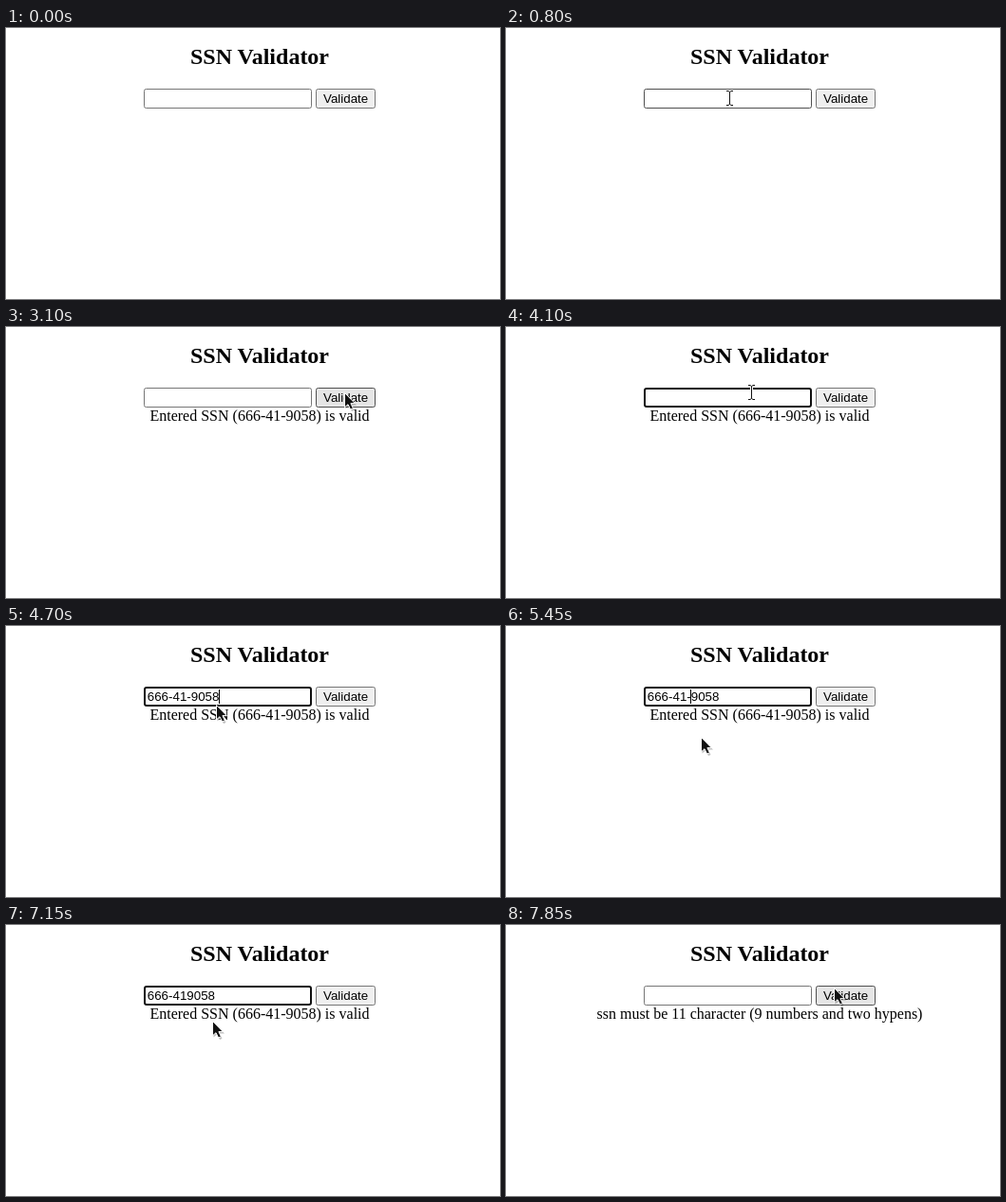
Recreate the animation shown at these times as an HTML page. Size 520 by 286 pixels, loop 8 s.

```html
<!DOCTYPE html>
<html lang="en">
<head>
<meta charset="utf-8">
<title>SSN Validator</title>
<style>
  html, body { margin: 0; width: 520px; height: 286px; overflow: hidden; background: #fff; }
  body { position: relative; color: #000; }
  body > * { position: absolute; box-sizing: border-box; margin: 0; white-space: pre; }
  h2, #message { left: 0; width: 534px; text-align: center; font-family: "Liberation Serif", serif; }
  h2 { top: 17px; font-size: 24px; line-height: 27px; }
  #message { top: 85px; font-size: 16px; line-height: 18px; }
  #field, #button { top: 64px; height: 21px; border: 1px solid #767676; border-radius: 2.5px; }
  #field { left: 145px; width: 177px; }
  #button { left: 326px; width: 63px; background: #efefef; }
  #field.hover, #button.hover { border-color: #4f4f4f; }
  #field.focus { border: 2px solid #101010; border-radius: 3px; }
  #button.hover { background: #e5e5e5; }
  #button.active { background: #f5f5f5; border-color: #8d8d8d; }
  #value, #label { top: 67px; font: 13.3333px/15px "Liberation Sans", sans-serif; }
  #value { left: 148.8px; height: 15px; }
  #label { left: 334px; }
  #caret { position: absolute; top: 0; margin-left: -.28px; width: 1px; height: 15px; background: #000; }
  svg { left: 0; top: 0; overflow: visible; }
</style>
</head>
<body>
<h2>SSN Validator</h2>
<div id="field"></div>
<div id="value"><span id="before"></span><i id="caret"></i><span id="after"></span></div>
<div id="button"></div>
<div id="label">Validate</div>
<div id="message"></div>
<svg width="520" height="286">
  <defs><path id="stem" d="M-3 -7.5H-1L.5 -6.5L2 -7.5H4M.5 -6.5V6.5M-3 7.5H-1L.5 6.5L2 7.5H4" fill="none"/></defs>
  <g id="arrow">
    <path d="M.5 2V17.5L4 14.5L7 20L9.5 19L7 13.5H12Z" opacity=".25"/>
    <path d="M-.5 .5V15.8L3 12.7L5.6 18L8.4 16.8L5.9 11.6H10.3Z" fill="#111" stroke="#fff"/>
  </g>
  <g id="beam">
    <use href="#stem" stroke="#fff" stroke-width="3"/>
    <use href="#stem" stroke="#111"/>
  </g>
</svg>
<script>
const LOOP = 8000, STEP = 50, BLINK = 565;
const SSN = "666-41-9058";

// Pointer sweeps: each eases along a curve from the previous resting point
const home = [1, 78];
const sweeps = [
  { start: 300, end: 800, bend: [118, 44], to: [235, 74] },
  { start: 1650, end: 2350, bend: [347, 105], to: [357, 69] },
  { start: 3100, end: 3550, bend: [307, 72], to: [258, 69] },
  { start: 4050, end: 5050, bend: [248, 95], to: [196, 76] },
  { start: 5200, end: 5450, bend: [263, 84], to: [206, 117] },
  { start: 6900, end: 7700, bend: [219, 80], to: [346, 66] }
];

// What the user does; each event changes part of the form
const events = [
  { at: 0, value: "", caret: 0, message: "", focused: false, pressed: false, blinkFrom: 0 },
  { at: 1050, focused: true, blinkFrom: 1050 },
  { at: 1750, value: SSN, caret: 11, blinkFrom: 1750 },
  { at: 2500, focused: false, pressed: true },
  { at: 2600, value: "", caret: 0, pressed: false, message: `Entered SSN (${SSN}) is valid` },
  { at: 3520, focused: true, blinkFrom: 3520 },
  { at: 4300, value: SSN, caret: 11, blinkFrom: 4300 },
  { at: 5220, caret: 7, blinkFrom: 5220 },
  { at: 6150, value: SSN.slice(0, 6) + SSN.slice(7), caret: 6 },
  { at: 7700, focused: false, pressed: true },
  { at: 7800, value: "", pressed: false, message: "ssn must be 11 character (9 numbers and two hypens)" }
];

const el = id => document.getElementById(id);
const show = (id, on) => el(id).style.visibility = on ? "visible" : "hidden";
const ease = u => u * u * (3 - 2 * u);

function pointerAt(t) {
  let from = home;
  for (const { start, end, bend, to } of sweeps) {
    if (t < start) break;
    const s = ease(Math.min(1, (t - start) / (end - start)));
    from = from.map((a, i) => (1 - s) ** 2 * a + 2 * s * (1 - s) * bend[i] + s * s * to[i]);
  }
  return from.map(Math.round);
}

function draw(now) {
  const t = Math.floor(now % LOOP / STEP) * STEP;
  const form = Object.assign({}, ...events.filter(e => e.at <= t));
  const [x, y] = pointerAt(t);
  const entered = t >= sweeps[0].start;
  const overField = entered && x >= 145 && x < 322 && y >= 64 && y < 82;
  const overButton = entered && x >= 326 && x < 389 && y >= 64 && y < 85;

  el("field").className = form.focused ? "focus" : overField ? "hover" : "";
  el("button").className = form.pressed ? "active" : overButton ? "hover" : "";
  el("before").textContent = form.value.slice(0, form.caret);
  el("after").textContent = form.value.slice(form.caret);
  el("message").textContent = form.message;
  show("caret", form.focused && (t - form.blinkFrom) % (2 * BLINK) < BLINK);
  show("beam", overField);
  show("arrow", entered && !overField);
  for (const id of ["arrow", "beam"]) el(id).setAttribute("transform", `translate(${x} ${y})`);
}

const start = performance.now();
function tick() {
  draw(performance.now() - start);
  requestAnimationFrame(tick);
}
tick();
</script>
</body>
</html>
```
